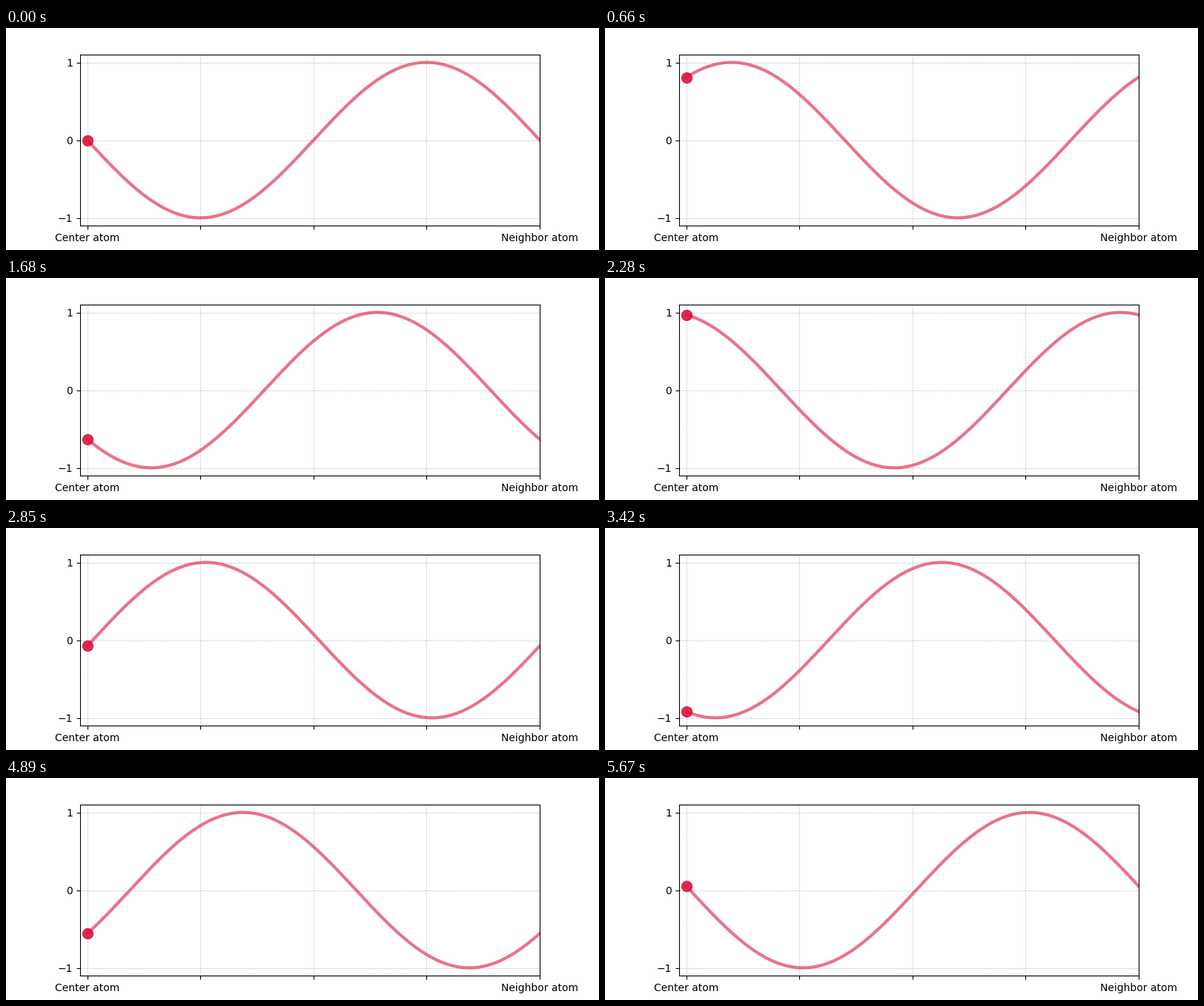
These frames come from a looping animation (800x300 px, 5.7 s). A matplotlib script:

```python
import matplotlib.pyplot as plt
import numpy as np
from matplotlib.animation import FuncAnimation

FRAMES = 190
INTERVAL = 30  # ms
PHASE_STEP = 0.1  # radians per frame
COLOR = "crimson"

plt.rcParams["font.family"] = "DejaVu Sans"


def wave(x, frame):
    return np.sin(PHASE_STEP * frame - x)


fig, ax = plt.subplots(figsize=(8, 3), dpi=100)
ax.set_xlim(-0.1, 2 * np.pi)
ax.set_ylim(-1.1, 1.1)
ax.set_xticks(np.linspace(0, 2 * np.pi, 5),
              ["Center atom", "", "", "", "Neighbor atom"])
ax.set_yticks([-1, 0, 1])
ax.grid(True, linestyle="--", linewidth=0.5, alpha=0.8)

x = np.linspace(0, 2 * np.pi, 400)
line, = ax.plot(x, wave(x, 0), color=COLOR, lw=3, alpha=0.6)
dot, = ax.plot([0], [0], "o", color=COLOR, markersize=10, alpha=0.9)


def update(frame):
    line.set_ydata(wave(x, frame))
    dot.set_ydata([wave(0, frame)])
    return line, dot


anim = FuncAnimation(fig, update, frames=FRAMES, interval=INTERVAL,
                     repeat=True, repeat_delay=0, blit=False)

plt.show()
```
